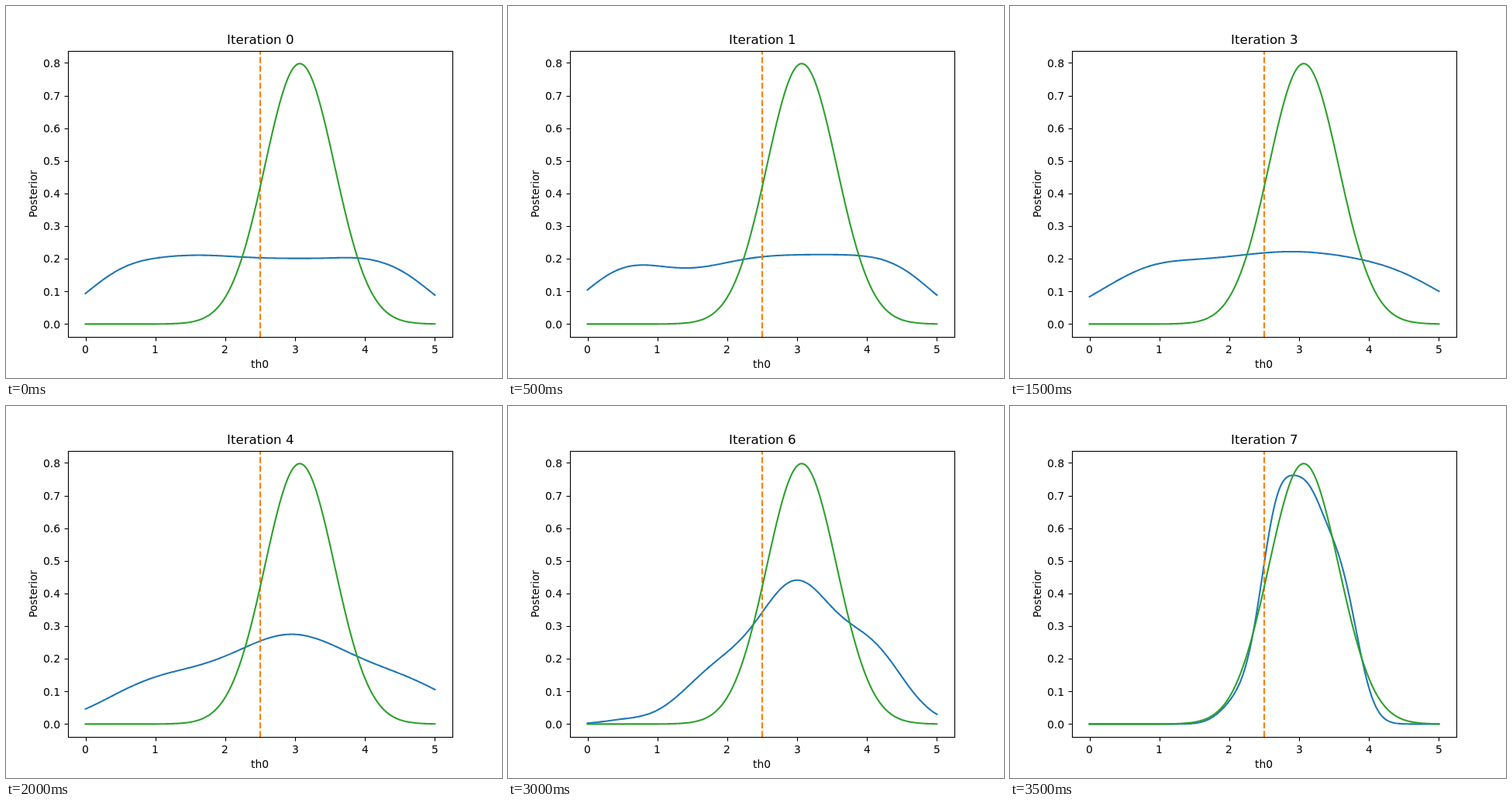
Animation, 640 px wide and 480 px high, one loop 4000 ms. Source, as an HTML page with a canvas:

```html
<!DOCTYPE html>
<html lang="en">
<head>
<meta charset="utf-8">
<title>Posterior by iteration</title>
<style>
  html, body { margin: 0; width: 100%; height: 100%; overflow: hidden; background: #fff; }
  canvas { display: block; }
</style>
</head>
<body>
<canvas id="plot" width="640" height="480"></canvas>
<script>
const ctx = document.getElementById('plot').getContext('2d');
const STEP = 500;
const FONT = '"DejaVu Sans", sans-serif';
const px = x => 102.545 + 90.182 * x;
const py = y => 410.4 - 421.2 * y;

// Close approximation of the normal distribution function
const normalCdf = z => 1 / (1 + Math.exp(-1.5976 * z - 0.07056 * z ** 3));

const bump = (height, center, spread) => x =>
  height * Math.exp(-(((x - center) / spread) ** 2) / 2);
const plateau = (height, from, to, softness) => x =>
  height * (normalCdf((x - from) / softness) - normalCdf((x - to) / softness));
const sum = (...parts) => x => parts.reduce((total, part) => total + part(x), 0);

// A flat prior that narrows towards the true posterior
const estimates = [
  sum(plateau(0.201, 0.04, 4.93, 0.47), bump(0.01, 1.6, 0.5), bump(0.004, 3.9, 0.3)),
  sum(plateau(0.213, 0, 4.9, 0.47), bump(-0.041, 1.42, 0.57)),
  sum(plateau(0.205, 0.13, 4.97, 0.52), bump(0.012, 3, 0.6)),
  sum(plateau(0.195, 0.12, 5.02, 0.65), bump(0.027, 2.9, 0.72), bump(0.007, 0.9, 0.4)),
  sum(plateau(0.165, 0.35, 5.2, 0.6), bump(0.11, 2.95, 0.7)),
  sum(bump(0.077, 1.22, 0.7), bump(0.305, 2.85, 0.73), bump(0.172, 4.38, 0.74)),
  sum(bump(0.01, 0.5, 0.3), bump(0.16, 1.9, 0.54), bump(0.405, 3, 0.52), bump(0.21, 4.07, 0.47)),
  sum(bump(0.07, 2.15, 0.25), bump(0.52, 2.66, 0.24), bump(0.62, 3.13, 0.28), bump(0.345, 3.63, 0.24))
];
const truth = bump(0.7979, 3.066, 0.5);

function drawCurve(f, color) {
  ctx.beginPath();
  for (let i = 0; i <= 250; i++) ctx.lineTo(px(i / 50), py(f(i / 50)));
  ctx.strokeStyle = color;
  ctx.lineWidth = 2.083;
  ctx.lineCap = 'square';
  ctx.lineJoin = 'round';
  ctx.stroke();
}

function drawLine(x1, y1, x2, y2) {
  ctx.beginPath();
  ctx.moveTo(x1, y1);
  ctx.lineTo(x2, y2);
  ctx.stroke();
}

// Text starts on a whole pixel; align is the share of its width left of x
function label(text, x, y, align = 0.5, size = 13.889) {
  ctx.font = `${size}px ${FONT}`;
  const left = x - align * ctx.measureText(text).width;
  ctx.fillText(text, Math.round(left), Math.round(y));
}

function drawAxes() {
  ctx.strokeStyle = ctx.fillStyle = '#000';
  ctx.lineWidth = 1.11;
  ctx.lineCap = 'butt';
  ctx.lineJoin = 'miter';
  ctx.strokeRect(80.5, 58.5, 496, 369);
  for (let i = 0; i <= 5; i++) {
    const x = Math.round(px(i)) + 0.5;
    drawLine(x, 427.5, x, 432.5);
    label(i, px(i), 448);
  }
  for (let i = 0; i <= 8; i++) {
    const y = Math.round(py(i / 10)) + 0.5;
    drawLine(75.5, y, 80.5, y);
    label((i / 10).toFixed(1), 70.28, py(i / 10) + 5.28, 1);
  }
  label('th0', 328, 467);
  ctx.save();
  ctx.rotate(-Math.PI / 2);
  label('Posterior', -242.4, 40);
  ctx.restore();
}

function draw(iteration) {
  ctx.fillStyle = '#fff';
  ctx.fillRect(0, 0, 640, 480);
  drawCurve(estimates[iteration], '#1f77b4');

  ctx.strokeStyle = '#ff7f0e';
  ctx.lineCap = 'butt';
  ctx.setLineDash([7.708, 3.333]);
  drawLine(328, 427, 328, 58);
  ctx.setLineDash([]);

  drawCurve(truth, '#2ca02c');
  drawAxes();
  label(`Iteration ${iteration}`, 328, 49, 0.5, 16.667);
}

const start = performance.now();
function tick() {
  draw(Math.floor((performance.now() - start) / STEP) % estimates.length);
  requestAnimationFrame(tick);
}
tick();
</script>
</body>
</html>
```
